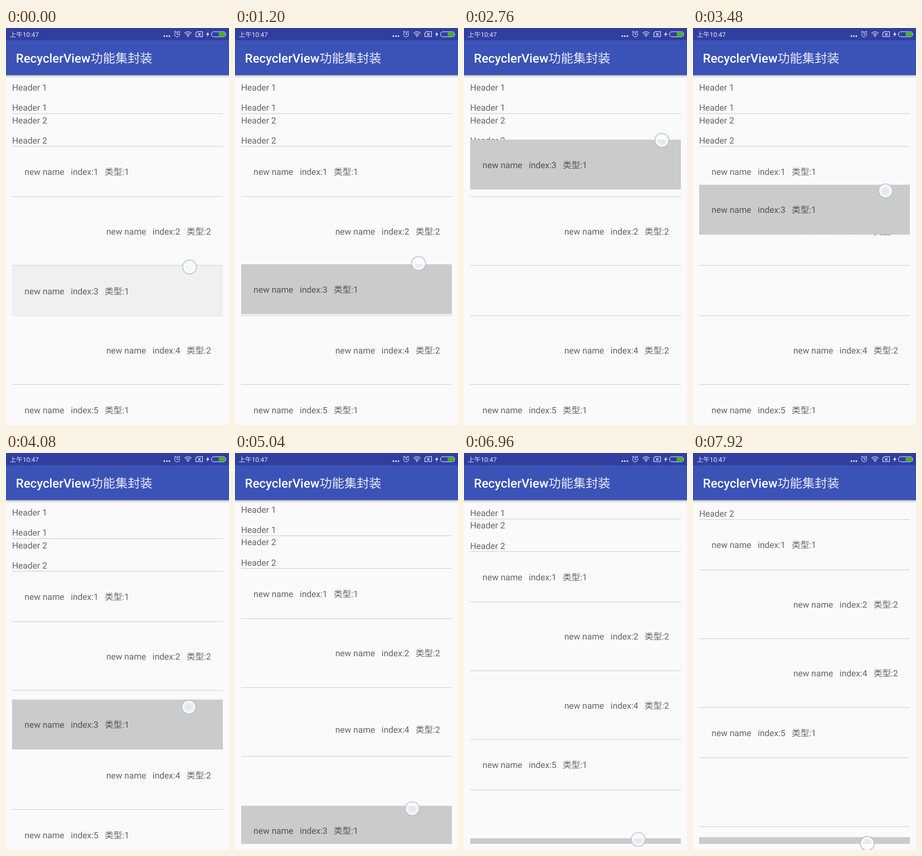
An HTML page with a canvas that plays this animation: 400 px wide and 711 px high, repeating every 8 s.

```html
<!DOCTYPE html>
<html lang="zh-CN">
<head>
<meta charset="utf-8">
<style>
  html, body { margin: 0; width: 100%; height: 100%; overflow: hidden; background: #fafafa; }
  canvas { display: block; width: 400px; height: 711px; }
</style>
</head>
<body>
<canvas></canvas>
<script>
const W = 400, H = 711, LOOP = 8000, STEP = 120;
const LIST = { x: 11, y: 95, w: 378, h: 605 };
const FONT = 'Roboto, "Noto Sans CJK SC", "Noto Sans CJK", sans-serif';
const HEIGHT = { 1: 90, 2: 123.3 };
const HEADERS_END = 211.9, DRAGGED_TOP = 426, TOUCH_LAG = 40;

const canvas = document.querySelector('canvas');
const ratio = window.devicePixelRatio || 1;
canvas.width = W * ratio;
canvas.height = H * ratio;
const ctx = canvas.getContext('2d');
ctx.scale(ratio, ratio);
ctx.textRendering = 'geometricPrecision';

// Keys: [time, value]
const touchX = [[600, 329.3], [960, 328.3], [1080, 328.3], [1920, 350.3], [2760, 355],
  [3600, 343], [4080, 328], [5040, 318], [6960, 312.7], [7920, 312.7]];
const touchY = [[0, 428], [1080, 428], [1560, 362], [1920, 277.5], [2280, 213], [2760, 201.3],
  [2880, 200.7], [3600, 318], [4080, 455], [4440, 552], [5040, 637], [6120, 683],
  [6960, 692], [7880, 690], [7920, 699.3]];
const scrollKeys = [[4740, 0], [5040, 5.2], [6120, 21], [6960, 35.2], [7440, 58], [7920, 92.6]];

// Times at which the dragged row trades places with the row below it
const swapTimes = { 4: 4853, 5: 5150, 6: 7910 };

// Smooth curve through the keys, level at turning points
function track(keys, t) {
  const last = keys.length - 1;
  if (t <= keys[0][0]) return keys[0][1];
  if (t >= keys[last][0]) return keys[last][1];
  const slope = i => {
    const a = keys[Math.max(0, i - 1)], k = keys[i], b = keys[Math.min(last, i + 1)];
    const turning = i > 0 && i < last && (k[1] - a[1]) * (b[1] - k[1]) <= 0;
    return turning ? 0 : (b[1] - a[1]) / (b[0] - a[0]);
  };
  const i = keys.findIndex(k => k[0] > t) - 1;
  const [t0, v0] = keys[i], [t1, v1] = keys[i + 1];
  const d = t1 - t0, u = (t - t0) / d, w = 1 - u;
  return v0 * w * w * (1 + 2 * u) + v1 * u * u * (3 - 2 * u)
    + d * u * w * (slope(i) * w - slope(i + 1) * u);
}

function text(str, x, y, size, color, weight = 400) {
  ctx.font = `${weight} ${size}px ${FONT}`;
  ctx.fillStyle = color;
  ctx.fillText(str, x, y);
  return ctx.measureText(str).width;
}

function rect(x, y, w, h, color) {
  ctx.fillStyle = color;
  ctx.fillRect(x, y, w, h);
}

function circle(x, y, r, fill, stroke, width = 1) {
  ctx.beginPath();
  ctx.arc(x, y, r, 0, Math.PI * 2);
  if (fill) { ctx.fillStyle = fill; ctx.fill(); }
  if (stroke) { ctx.strokeStyle = stroke; ctx.lineWidth = width; ctx.stroke(); }
}

function path(d, color, filled) {
  const p = new Path2D(d);
  ctx.lineWidth = 1.1;
  ctx.fillStyle = ctx.strokeStyle = color;
  filled ? ctx.fill(p) : ctx.stroke(p);
}

const label = (str, x, y) => text(str, x, y, 15.555, 'rgba(0,0,0,.6)');
const divider = y => rect(LIST.x, y - 0.6, LIST.w, 1.1, '#d2d2d2');
const typeOf = index => index % 2 ? 1 : 2;

function rowText(index, top) {
  const type = typeOf(index);
  label(`new name   index:${index}   类型:${type}`, type === 1 ? 33.3 : 180, top + HEIGHT[type] / 2 + 6);
}

function drawList(t) {
  const scroll = track(scrollKeys, t);
  ctx.save();
  ctx.beginPath();
  ctx.rect(LIST.x, LIST.y, LIST.w, LIST.h);
  ctx.clip();

  [1, 2].forEach(n => {
    const top = 95 + (n - 1) * 58.5 - scroll;
    label('Header ' + n, 11, top + 17.1);
    label('Header ' + n, 11, top + 53.3);
    divider(top + 58.4);
  });

  const order = [1, 2, 4, 5, 6];
  const place = order.filter(n => n < 3 || t >= swapTimes[n]).length;
  order.splice(place, 0, 3);

  let top = HEADERS_END - scroll;
  for (const index of order) {
    if (index !== 3) {
      const u = Math.min(1, (t - swapTimes[index]) / 250);
      const shift = u >= 0 ? HEIGHT[1] * (1 + Math.cos(Math.PI * u)) / 2 : 0;
      rowText(index, top + shift);
    }
    top += HEIGHT[typeOf(index)];
    divider(top);
  }

  const draggedTop = DRAGGED_TOP + track(touchY, t - TOUCH_LAG) - 428;
  rect(LIST.x, draggedTop, LIST.w, 89.3, t < 360 ? '#f0f0f0' : '#cbcbcb');
  rowText(3, draggedTop - 0.3);
  ctx.restore();
}

function drawBars() {
  const shadow = ctx.createLinearGradient(0, 84, 0, 90);
  shadow.addColorStop(0, 'rgba(0,0,0,.34)');
  shadow.addColorStop(0.4, 'rgba(0,0,0,.1)');
  shadow.addColorStop(1, 'rgba(0,0,0,0)');
  rect(0, 84, W, 6, shadow);
  rect(0, 0, W, 22, '#303f9f');
  rect(0, 22, W, 62.3, '#3b52b7');

  const width = text('RecyclerView', 17.8, 62, 22.22, '#fff', 500);
  text('功能集封装', 17.8 + width, 62, 22.22, 'rgba(255,255,255,.9)', 300);

  const ink = '#e3e6f4';
  text('上午10:47', 6.7, 15.7, 11.6, ink);
  [284, 288.5, 293].forEach(x => circle(x, 14.5, 1.5, ink));
  circle(307, 11.5, 4.5, null, ink);
  path('M307 8.5V11.8H309.5M302 7.5L304.5 5.3M312 7.5L309.5 5.3', ink);
  path('M320 9.2Q326.5 3.8 333 9.2M322 11.4Q326.5 7.6 331 11.4M324 13.4Q326.5 11.4 329 13.4', ink);
  circle(326.5, 15, 1.1, ink);
  path('M343 6.5H352.5V15.5H340.5V9ZM344.5 9L349 13.5M349 9L344.5 13.5', ink);
  path('M363 6.5L358.8 12H361.4L360.4 16L365 10.3H362.2Z', ink, true);
  ctx.beginPath();
  ctx.roundRect(368.5, 6.8, 25.5, 9, 4.5);
  ctx.stroke();
  ctx.beginPath();
  ctx.roundRect(381.5, 8, 11.3, 6.6, [0, 3.3, 3.3, 0]);
  ctx.fillStyle = '#46b80c';
  ctx.fill();
}

function drawTouch(t) {
  const x = track(touchX, t), y = track(touchY, t);
  const glow = ctx.createRadialGradient(x, y, 0, x, y, 13);
  glow.addColorStop(0, 'rgba(255,255,255,.5)');
  glow.addColorStop(0.4, 'rgba(255,255,255,.58)');
  glow.addColorStop(0.8, 'rgba(255,255,255,.88)');
  glow.addColorStop(1, 'rgba(255,255,255,.8)');
  circle(x, y, 12.5, glow, 'rgba(160,178,222,.8)', 1.5);
}

function frame(now) {
  const t = Math.floor(now % LOOP / STEP) * STEP;
  rect(0, 0, W, H, '#fafafa');
  drawList(t);
  drawBars();
  drawTouch(t);
  requestAnimationFrame(frame);
}
requestAnimationFrame(frame);
</script>
</body>
</html>
```
